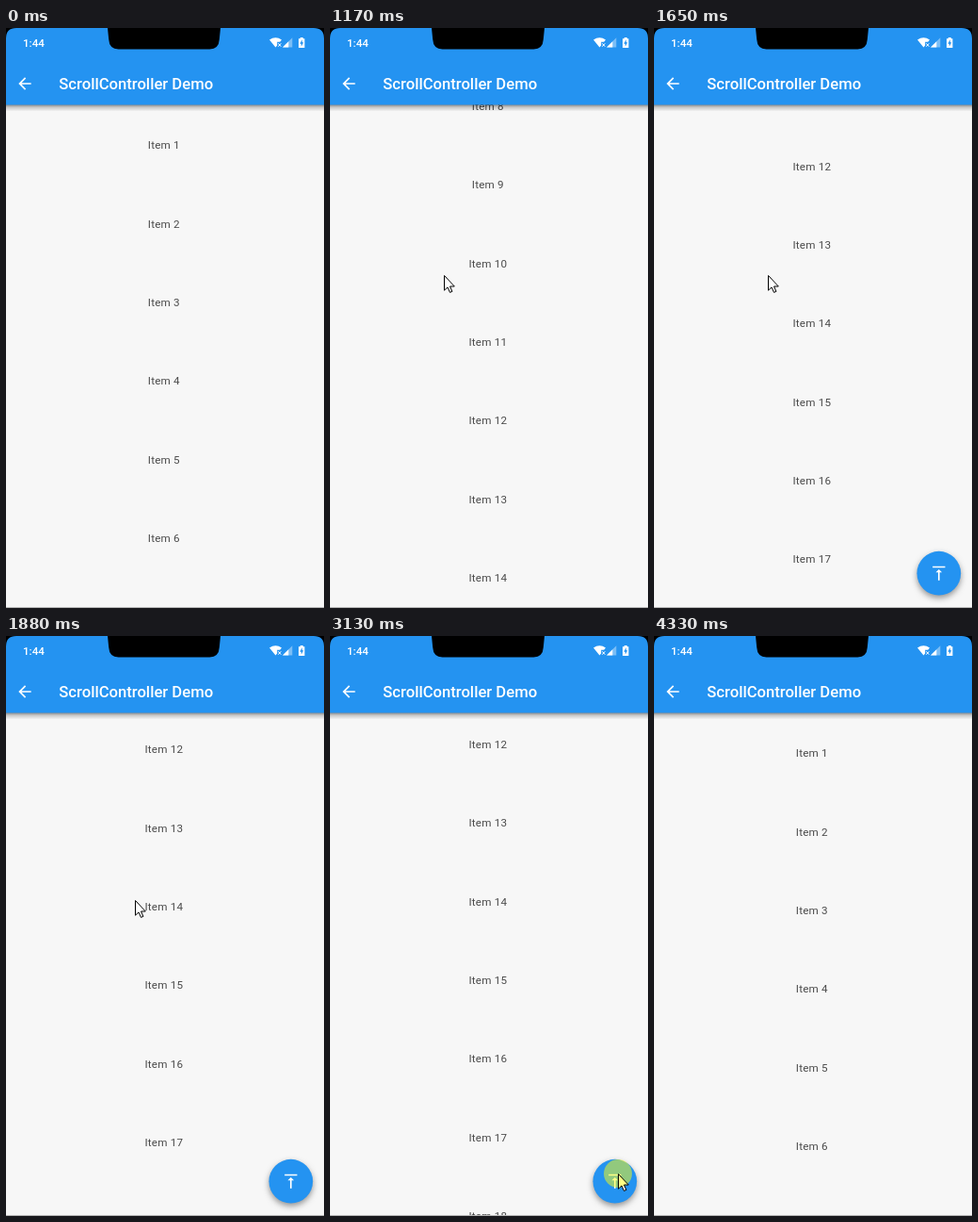
Write an HTML page with a canvas that moves like this. It is 338 px wide and 615 px high and loops after 4990 ms.

```html
<!DOCTYPE html>
<html lang="en">
<head>
<meta charset="utf-8">
<title>Scroll to top</title>
<style>
  html, body { margin: 0; width: 100%; height: 100%; overflow: hidden; background: #f7f7f7; }
  canvas { display: block; width: 338px; height: 615px; }
</style>
</head>
<body>
<canvas id="stage"></canvas>
<script>
const W = 338, H = 615, LOOP = 4990;
const REFRESH = 45;           // ms between screen updates
const BLUE = '#2493f1', PAPER = '#f7f7f7';
const DP = 0.8335;            // screen pixels per layout unit
const ROW = 100 * DP;
const BAR = 81.5;             // bottom of the app bar

const canvas = document.getElementById('stage');
const ctx = canvas.getContext('2d');
const ratio = window.devicePixelRatio || 1;
canvas.width = W * ratio;
canvas.height = H * ratio;

const backArrow = new Path2D('M20 11H7.83l5.59-5.59L12 4l-8 8 8 8 1.41-1.41L7.83 13H20z');
const toTop = new Path2D('M8 11h3v10h2V11h3l-4-4zM4 3v2h16V3z');
const notch = new Path2D('M108 0L109.2 12Q109.8 22.4 119.5 22.4H216.5Q226.2 22.4 226.8 12L228 0Z');
const corners = new Path2D('M0 0H11Q0 0 0 11ZM338 0H327Q338 0 338 11Z');
const wifi = new Path2D('M280 12.6Q286.5 7.8 293 12.6L291.2 14.8H288.2V18.6L286.5 20.6Z');
const wifiCross = new Path2D('M289.3 16.3l3 3.4m0-3.4l-3 3.4');
const signal = new Path2D('M294 20.5L304.3 10.2V20.5Z');
const signalLevel = new Path2D('M294 20.5L300.3 14.2V20.5Z');
const battery = new Path2D('M311 11.2H312.8V10H315.7V11.2H317.4V21H311Z');
const bolt = new Path2D('M314.8 12.2L312.3 16.7H313.8V19.8L316.2 15.3H314.8Z');
const arrow = new Path2D('M.5 .5V16.2L4 12.9L6.5 18.4L8.9 17.4L6.5 12H11.3Z');

const progress = (t, start, end) => Math.min(1, Math.max(0, (t - start) / (end - start)));
const easeOut = (u, power) => 1 - (1 - u) ** power;
const glide = (t, start, end, distance) => {
  const u = progress(t, start, end);
  return distance * u * u * (3 - 2 * u);
};

// A fling that slows down, a short pull back, then a jump to the top
function scrollAt(t) {
  const fling = 926 * easeOut(progress(t, 846.5, 2312), 4.5);
  const pull = 60 * progress(t, 3265, 3540);
  const jump = 866 * easeOut(progress(t, 3668, 3808), 3);
  return fling - pull - jump;
}

const fabScaleAt = t => progress(t, 1300, 1530) - progress(t, 3670, 3915);

// Enter, swipe up, travel to the button, leave
function pointerAt(t) {
  return {
    x: 172 + glide(t, 150, 380, -69) + glide(t, 810, 900, 18)
      + glide(t, 1740, 2318, 185) + glide(t, 4232, 4320, 14),
    y: 565 + glide(t, 150, 380, -60) + glide(t, 801, 869, -243)
      + glide(t, 1740, 2407, 273) + glide(t, 2430, 2660, 35) + glide(t, 4232, 4320, 38)
  };
}

const isPressed = t => (t >= 610 && t < 940) || (t >= 3130 && t < 3310);

function fill(path, color) {
  ctx.fillStyle = color;
  ctx.fill(path);
}

function text(str, x, y, font, color, align = 'left', spacing = '0px') {
  ctx.font = `${font} Roboto, sans-serif`;
  ctx.letterSpacing = spacing;
  ctx.textAlign = align;
  ctx.fillStyle = color;
  ctx.fillText(str, x, y);
}

function disc(x, y, r, color) {
  ctx.beginPath();
  ctx.arc(x, y, r, 0, Math.PI * 2);
  ctx.fillStyle = color;
  ctx.fill();
}

function at(x, y, scale, draw) {
  ctx.save();
  ctx.translate(x, y);
  ctx.scale(scale, scale);
  draw();
  ctx.restore();
}

function drawList(scroll) {
  ctx.fillStyle = PAPER;
  ctx.fillRect(0, 0, W, H);
  const first = Math.max(1, Math.floor(scroll / ROW));
  for (let n = first; n < first + 9; n++) {
    const baseline = 128.2 + (n - 1) * ROW - scroll;
    text(`Item ${n}`, 167.8, baseline, '11.67px', 'rgba(0,0,0,.7)', 'center', '.21px');
  }
  ctx.fillStyle = '#b4b4b4';
  ctx.fillRect(0, 614, W, 1);
}

function drawHeader() {
  const shade = ctx.createLinearGradient(0, BAR, 0, BAR + 7);
  shade.addColorStop(0, 'rgba(0,0,0,.42)');
  shade.addColorStop(.4, 'rgba(0,0,0,.18)');
  shade.addColorStop(1, 'rgba(0,0,0,0)');
  ctx.fillStyle = shade;
  ctx.fillRect(0, BAR - 1, W, 8);
  ctx.fillStyle = BLUE;
  ctx.fillRect(0, 0, W, BAR);
  fill(notch, '#000');
  fill(corners, '#000');

  text('1:44', 18, 20.3, '500 11.67px', '#fff');
  fill(wifi, '#fff');
  ctx.strokeStyle = '#fff';
  ctx.lineWidth = 1;
  ctx.stroke(wifiCross);
  fill(signal, 'rgba(255,255,255,.4)');
  fill(signalLevel, '#fff');
  fill(battery, '#fff');
  fill(bolt, BLUE);

  at(10, 49, DP, () => fill(backArrow, '#fff'));
  text('ScrollController Demo', 56.3, 65, '500 16.67px', '#fff');
}

function drawFab(scale) {
  if (scale <= 0) return;
  at(302.8, 578.2, DP * scale, () => {
    ctx.save();
    ctx.shadowColor = 'rgba(0,0,0,.4)';
    ctx.shadowBlur = 6 * ratio;
    ctx.shadowOffsetY = 3 * ratio;
    disc(0, 0, 28, BLUE);
    ctx.restore();
    ctx.rotate((scale - 1) * Math.PI / 4);
    ctx.translate(-12, -12);
    fill(toTop, '#fff');
  });
}

function drawPointer({ x, y }, pressed) {
  at(Math.round(x), Math.round(y), 1, () => {
    fill(arrow, '#fff');
    if (pressed) disc(0, 0, 15, 'rgba(255,255,10,.5)');
    ctx.strokeStyle = '#000';
    ctx.lineWidth = 1;
    ctx.stroke(arrow);
  });
}

function render() {
  const now = performance.now() % LOOP;
  const t = Math.floor(now / REFRESH) * REFRESH;
  ctx.setTransform(ratio, 0, 0, ratio, 0, 0);
  drawList(scrollAt(t));
  drawHeader();
  drawFab(fabScaleAt(t));
  if (now >= 150 && now < 4330) drawPointer(pointerAt(t), isPressed(now));
  requestAnimationFrame(render);
}
render();
</script>
</body>
</html>
```
